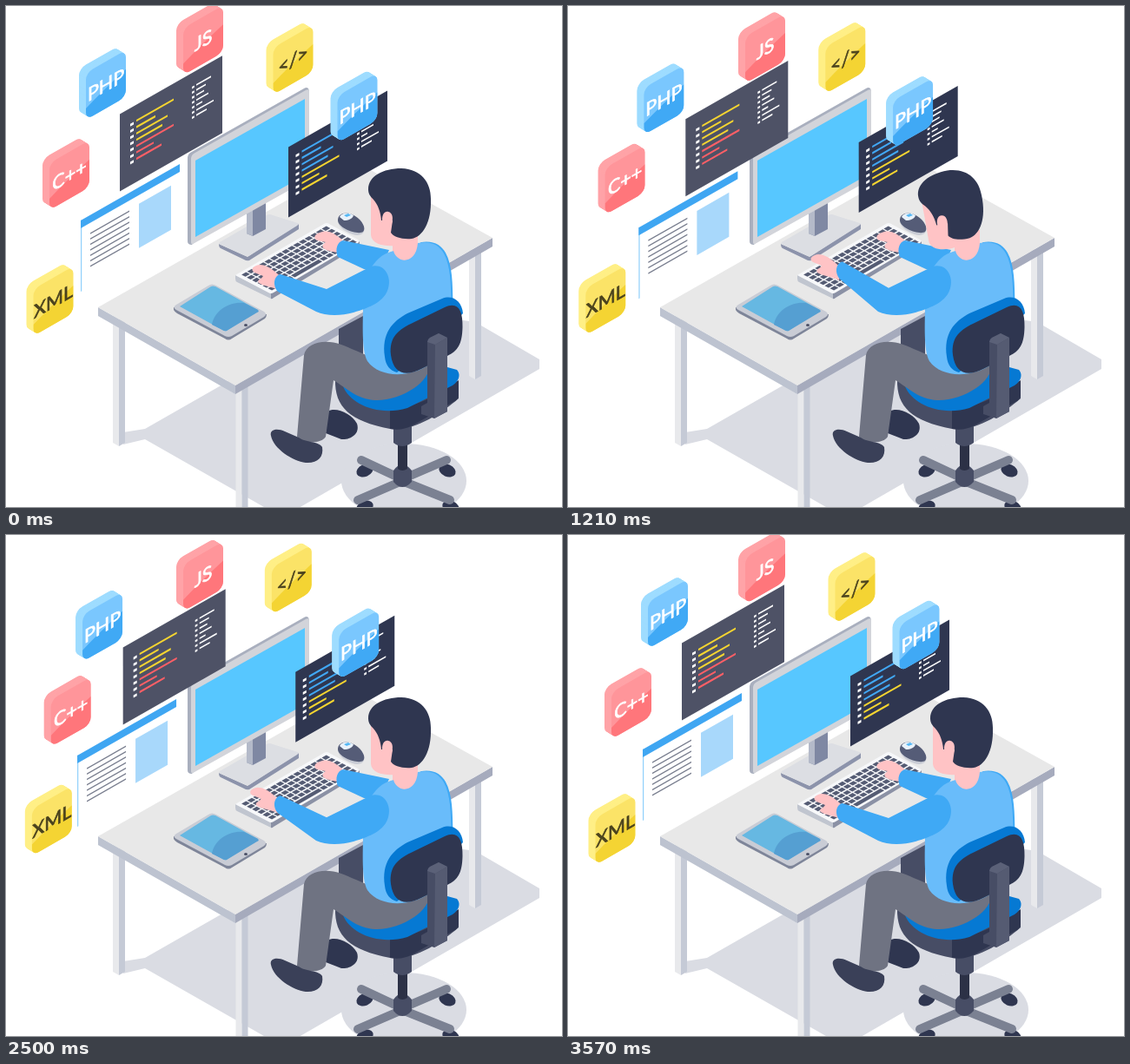
These frames come from a looping animation (640x577 px, 3640 ms). An HTML page with a canvas:

```html
<!DOCTYPE html>
<html lang="en">
<head>
<meta charset="utf-8">
<title>Programmer at work</title>
<style>
html, body { margin: 0; width: 100%; height: 100%; overflow: hidden; background: #fff; }
canvas { display: block; width: 640px; height: 577px; }
</style>
</head>
<body>
<canvas id="stage" width="640" height="577"></canvas>
<script>
const ctx = document.getElementById('stage').getContext('2d');
const LOOP = 3640, STEPS = 50, SLOPE = -0.57;
const SKIN = '#ffc3c5', NAVY = '#2f3650', SLATE = '#474d65', SLEEVE = '#3fa9f5';

function shape(color, path) {
  ctx.fillStyle = color;
  ctx.fill(new Path2D(path));
}

function line(color, width, path) {
  ctx.strokeStyle = color;
  ctx.lineWidth = width;
  ctx.stroke(new Path2D(path));
}

function at(x, y, draw) {
  ctx.save();
  ctx.translate(x, y);
  draw();
  ctx.restore();
}

// Local plane facing left-front: x runs up to the right, y straight down.
function onWall(x, y, draw) {
  at(x, y, () => {
    ctx.transform(1, SLOPE, 0, 1, 0, 0);
    draw();
  });
}

function bar(color, x, y, w, h) {
  ctx.fillStyle = color;
  ctx.fillRect(x, y, w, h);
}

// Eased value between [step, value] keys.
function keyed(step, keys) {
  const n = keys.findIndex(k => k[0] >= step);
  if (n <= 0) return keys[0][1];
  const [s0, v0] = keys[n - 1], [s1, v1] = keys[n];
  const p = (step - s0) / (s1 - s0);
  return v0 + (v1 - v0) * p * p * (3 - 2 * p);
}

function floor() {
  shape('#dadce3', 'M135 491L160 487L265 427L410 345L540 364L614 407V418L318 589L160 499L135 505Z');
  ctx.beginPath();
  ctx.ellipse(458, 547, 72, 43, 0, 0, 7);
  ctx.fill();
}

function leg(x, top, bottom) {
  shape('#e8e9ec', `M${x} ${top}h7v${bottom - top}l-7 -4Z`);
  shape('#c5cad6', `M${x + 7} ${top}h7v${bottom - top - 4}l-7 4Z`);
}

function desk() {
  leg(123, 355, 507);
  leg(533, 280, 430);
  leg(264.5, 435, 600);
  shape('#bdc3d0', 'M106 347L264 437V447L106 357Z');
  shape('#a6abbd', 'M264 437L560 267V277L264 447Z');
  shape('#e8e8e8', 'M106 347L402 179L560 267L264 437Z');
}

function monitor() {
  shape('#8c93ab', 'M245 274L278 289L337 251V257L280 293Q277 294 274 292L247 279Q245 278 245 274Z');
  shape('#dcdee3', 'M246 272L300 241Q303 239 307 241L336 250Q338 251 335 253L281 287Q278 289 274 287L247 275Q244 274 246 272Z');
  shape('#7f88a3', 'M277 233L299 221V257L284 265L277 262Z');
  shape('#b4bac9', 'M277 233L284 229V265L277 262Z');
  shape('#a9afbe', 'M209 174Q209 171 212 169L343 95Q346 93 348 95L349 98L214 275Q209 275 209 271Z');
  shape('#d2d4da', 'M213 175Q213 172 216 170L345 97Q349 95 349 98V196Q349 199 346 201L217 273Q213 276 213 272Z');
  shape('#57c7ff', 'M218 178L344 107V195L218 266Z');
}

function tablet() {
  shape('#7e8599', 'M193 347V350Q194 352 197 354L252 383Q256 386 260 383L298 360Q300 358 300 355Z');
  shape('#c9ccd5', 'M196 344L233 322Q237 319 242 322L297 352Q301 355 297 358L260 380Q256 382 252 380L196 350Q191 347 196 344Z');
  shape('#66b8e2', 'M200 346L236 323Q238 322 241 323L290 350L254 374Q252 375 249 373Z');
  shape('#559fd2', 'M237 367C240 350 258 340 274 342L290 350Q292 352 289 353L254 374Q252 375 249 373Z');
  shape('#4b5066', 'M274 367.5a2 1.5 0 1 0 4 0a2 1.5 0 1 0 -4 0Z');
}

function keyboard() {
  shape('#c0c5cf', 'M264 310L305 331V337L266 318Q264 317 264 314Z');
  shape('#8b91a5', 'M305 331L407 271V276L308 336Q306 338 305 337Z');
  shape('#f7f8fa', 'M264 310L366 251Q369 249 372 251L405 269Q408 271 405 273L308 330Q305 332 302 330Z');
  ctx.save();
  ctx.transform(6.6, -3.78, 6.1, 3.15, 265, 310);
  for (let row = 0; row < 6; row++) {
    for (let col = 0; col < 15; col++) {
      if (row === 5 && col > 3 && col < 9) continue;
      bar('#555c74', col + 0.5, row + 0.45, 0.8, 0.74);
    }
  }
  bar('#555c74', 4.5, 5.45, 4.8, 0.74);
  ctx.restore();
}

function mouse() {
  shape('#c9ccd5', 'M382 246C382 254 388 259 399 263C407 266 414 262 412 255Z');
  shape('#555c77', 'M382 247C382 238 393 236 402 242C410 247 415 256 411 260C406 264 383 257 382 247Z');
  shape('#e9f2fb', 'M384 243C386 238 394 237 400 241C399 245 394 247 389 247Z');
  shape('#57b8f4', 'M389 241l5 -2l3 2l-5 2Z');
}

function codePanel(x, y, p) {
  onWall(x, y, () => {
    bar(p.back, 0, 0, p.w, p.h);
    [43, 22, 36, 30, 43, 20, 29].forEach((len, n) => {
      const top = p.codeY + n * 7.3;
      bar('#fff', p.codeX - 7, top - 1.5, 4, 3);
      bar(n < 4 ? p.first : p.second, p.codeX, top - 2.1, len, 2.3);
    });
    [17, 11, 9, 14, 7, 20, 12].forEach((len, n) => {
      const top = p.listY + n * 5.8;
      bar('#fff', p.listX - 5, top - 1.2, 2.8, 2.4);
      bar('#fff', p.listX, top - 1.3, len, 1.8);
    });
  });
}

const leftPanel = { back: '#4e5266', w: 118, h: 89, first: '#f5d530', second: '#ff5f66',
  codeX: 19, codeY: 19.5, listX: 88, listY: 17 };
const rightPanel = { back: NAVY, w: 114, h: 81, first: '#41a8f5', second: '#f5d530',
  codeX: 15.5, codeY: 15, listX: 84, listY: 13 };

function browserPanel(x, y) {
  onWall(x, y, () => {
    bar('#fff', 0, 0, 114, 82);
    bar('#8fd0fb', 0, 0, 1.2, 82);
    bar('#3fa6f2', 0, 0, 114, 9);
    bar('#a8d8fb', 67, 19, 37, 51);
    for (let n = 0; n < 7; n++) bar('#777c8d', 11, 20.5 + n * 6.3, 45, 1.5);
  });
}

const blue = { side: '#9edcff', light: '#7ac7fe', base: '#40a9f5', ink: '#fff' };
const red = { side: '#ffa3a7', light: '#ff959a', base: '#ff767b', ink: '#fff' };
const yellow = { side: '#ffef86', light: '#fbe367', base: '#f4d433', ink: '#4a421d' };

// x is the left edge, y the bottom edge of the tile.
function tile(x, y, label, c) {
  const face = new Path2D();
  face.roundRect(0, 0, 46, 54, 8);
  for (let d = 8; d > 0; d -= 0.5) {
    onWall(x + 8 - d, y - 51.5 - d * 0.62, () => {
      ctx.fillStyle = c.side;
      ctx.fill(face);
    });
  }
  onWall(x + 8, y - 51.5, () => {
    ctx.fillStyle = c.light;
    ctx.fill(face);
    ctx.save();
    ctx.clip(face);
    shape(c.base, 'M0 41Q18 32 46 22V56H0Z');
    ctx.restore();
    ctx.fillStyle = ctx.strokeStyle = c.ink;
    ctx.lineWidth = 0.7;
    ctx.font = '21.5px Lato, sans-serif';
    ctx.textAlign = 'center';
    ctx.fillText(label, 23, 34.5);
    ctx.strokeText(label, 23, 34.5);
  });
}

function chairBase() {
  for (const [x, y] of [[413, 535], [508, 535], [413, 577], [512, 577]]) {
    ctx.fillStyle = NAVY;
    ctx.beginPath();
    ctx.ellipse(x, y, 10, 7, x < 458 ? -0.4 : 0.4, 0, 7);
    ctx.fill();
  }
  ctx.lineCap = 'round';
  line('#7b8192', 10, 'M456 545L409 523M456 545L507 523M456 547L405 569M456 547L511 569');
  ctx.lineCap = 'butt';
  shape(SLATE, 'M446 535Q456 521 467 535V548Q456 560 446 548Z');
  shape('#2c3146', 'M451 500H462V533Q456 537 451 533Z');
  shape(SLATE, 'M446 480H467V503Q456 511 446 503Z');
}

function legsAndSeat() {
  shape(SLATE, 'M383 372L411 357V408L383 398Z');
  shape(NAVY, 'M370 467C380 461 398 470 404 481C408 493 396 500 386 499L368 492Z');
  shape(SLATE, 'M379 430C378 462 396 478 442 487C470 490 500 470 521 452V432L450 440Z');
  shape(NAVY, 'M442 464C470 464 500 446 521 431V449Q521 453 515 456L470 482Q456 490 442 487Z');
  shape('#0679d3', 'M388 438C396 458 428 473 462 463L514 437C523 431 523 423 519 419L508 416L440 430Z');
  shape('#6f7382', 'M343 402C346 388 366 383 386 390C410 399 440 418 487 413C490 432 455 455 425 454C404 453 392 440 377 431L368 496C363 505 340 504 335 496Z');
  shape('#3a4058', 'M305 495C303 487 313 486 321 490L337 497C345 503 360 501 364 508C366 520 358 527 345 526C330 524 308 510 305 495Z');
}

function chairBack() {
  shape('#0679d3', 'M436 404C432 377 445 363 462 354L502 337C514 332 525 340 526 354L500 380L450 422C442 420 437 414 436 404Z');
  shape(NAVY, 'M443 402C441 381 451 373 470 364L505 347C520 340 526 350 525.5 370C525 390 520 397 508 403L478 418C460 427 446 424 443 402Z');
  shape(SLATE, 'M485 387Q485 384 488 382L498 377L508 382V467L493 475L478 470V461L485 457Z');
  shape('#5b6178', 'M485 387Q485 384 488 382L498 377L508 382L494 390Z');
  shape('#555b72', 'M494 390L508 382V467L493 475Z');
}

// The far shoulder peeks out behind the shirt.
function body(shoulder) {
  const shirt = 'M420 302C430 286 440 284 446 282C450 297 472 298 474 273C490 270 499 276 504 285C512 300 512 320 512.5 345L500 400C484 426 434 434 416 409C409 396 411 365 411 345Z';
  shape(SKIN, 'M445 258H474V283Q468 299 445 290Z');
  ctx.save();
  ctx.beginPath();
  ctx.rect(477, 260, 50, 100);
  ctx.clip();
  at(shoulder, -shoulder / 3, () => shape(SLEEVE, shirt));
  ctx.restore();
  shape('#69bcfa', shirt);
}

function rightArm(dx, dy) {
  at(dx, dy, () => shape(SKIN, 'M390 272C379 262 372 258 364 260C355 262 353 267 358 270L368 272C361 277 365 280 372 282L386 285Z'));
  const x = 388 + dx, y = 270 + dy * 0.75;
  shape(SLEEVE, `M${x} ${y}L441 ${281 + dy * 0.3}L430 ${305 + dy * 0.3}L412 ${303 + dy * 0.35}L${x - 6} ${y + 19}C${x - 10} ${y + 10} ${x - 6} ${y + 1} ${x} ${y}Z`);
}

// Lifting raises the hand and cuff while the elbow stays put.
function leftArm(lift) {
  at(-lift / 3, -lift, () => shape(SKIN, 'M318 314C307 302 299 298 292 298C284 299 281 304 286 307L296 311C294 315 288 315 291 319C297 323 306 323 316 328Z'));
  const y = 309 - lift * 1.2;
  shape(SLEEVE, `M316 ${y}L369 ${326 - lift * 0.1}L420 300C436 296 444 312 440 325C436 340 420 347 400 353C385 357 368 357 357 352L313 ${y + 20}C306 ${y + 12} 309 ${y + 1} 316 ${y}Z`);
}

function head(turn) {
  ctx.save();
  ctx.translate(460, 294);
  ctx.rotate(-turn * Math.PI / 180);
  ctx.translate(-460, -294);
  shape(SKIN, 'M420 214V264C421 274 435 277 447 276L470 266V225Z');
  shape(NAVY, 'M417 211C417 196 434 187 455 187C478 188 489 203 489 222C490 250 479 266 467 268C456 269 446 266 443 261L445 247L432 247C431 236 428 229 423 223C419 219 417 216 417 211Z');
  shape(SKIN, 'M433 246C433 240 436 236 440 237C445 238 446 244 444 251C443 257 441 261 437 259C434 257 433 251 433 246Z');
  ctx.restore();
}

function render(step) {
  const angle = 2 * Math.PI * step / STEPS;
  const c = Math.cos(angle), s = Math.sin(angle), sway = 1 - c;
  const yellowX = -4.7 * sway - 4.7 * s, yellowY = -3.8 * sway + 5.8 * s;
  const orbitX = -2.2 * sway - 4.8 * s, orbitY = 5 * sway - 2.5 * s;
  const reachX = keyed(step, [[0, 0], [6, -4], [9, -4], [15, 0], [20, 0], [27, -6], [29, -6], [34, 0], [39, 0], [44, -4], [50, 0]]);
  const reachY = keyed(step, [[0, 0], [6, 4], [9, 4], [15, 0], [20, 0], [27, 18], [29, 18], [34, 0], [39, 0], [44, 4], [50, 0]]);

  bar('#fff', 0, 0, 640, 577);
  floor();
  desk();
  monitor();
  tablet();
  keyboard();
  mouse();

  browserPanel(86 - 3 * sway, 247 + 5.3 * sway);
  codePanel(131 + 2.8 * sway, 124.5 + 3.8 * sway, leftPanel);
  codePanel(325 + 6.3 * sway, 162.5 - 3.6 * sway, rightPanel);
  tile(196, 77 + 6.3 * sway, 'JS', red);
  tile(84 - 3 * sway, 128.5 + 11.3 * sway, 'PHP', blue);
  tile(42 + orbitX, 232.5 + orbitY, 'C++', red);
  tile(373.5 + orbitX, 155 + orbitY, 'PHP', blue);
  tile(299.5 + yellowX, 99.5 + yellowY, '</>', yellow);
  tile(23.5 + yellowX, 377.5 + yellowY, 'XML', yellow);

  chairBase();
  legsAndSeat();
  rightArm(reachX, reachY);
  body(2 - reachY / 9);
  leftArm(keyed(step, [[0, 0], [12, 12], [29, 12], [43, 0], [50, 0]]));
  head(keyed(step, [[0, 0], [10, 10], [20, 10], [30, 0], [35, 0], [44, 9], [45, 9], [50, 0]]));
  chairBack();
}

// The picture advances 14 times a second.
function tick() {
  const time = performance.now() % LOOP;
  render(Math.min(STEPS, Math.floor(time * 0.014 + 0.07)));
  requestAnimationFrame(tick);
}
tick();
</script>
</body>
</html>
```
